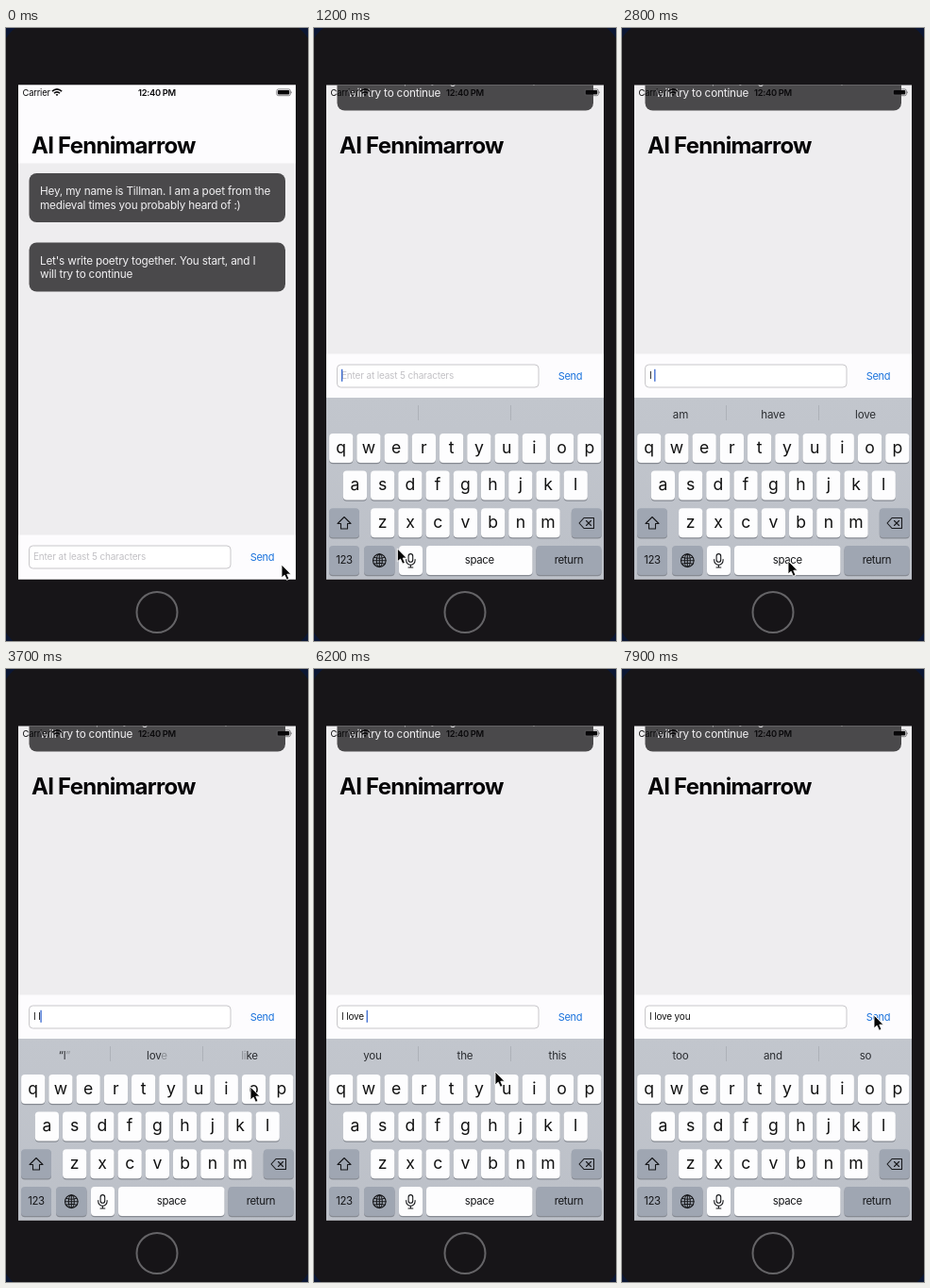
An HTML page that plays this animation: 320x650 px, repeating every 8 s.

```html
<!DOCTYPE html>
<html lang="en">
<head>
<meta charset="utf-8">
<title>Poetry chat</title>
<style>
  html, body { margin: 0; width: 100%; height: 100%; overflow: hidden; background: #0b1633; }
  svg { display: block; width: 320px; height: 650px; }
  text { font-family: Inter, Roboto, sans-serif; white-space: pre; }
  .mid { text-anchor: middle; }
  .bubble { fill: #4a494b; }
  .say { font-size: 11.76px; letter-spacing: -.19px; fill: #f1f0f2; }
  .title { font-size: 24px; font-weight: 700; letter-spacing: -.75px; fill: #060507; }
  .status { font-size: 9.4px; letter-spacing: -.2px; fill: #0a090b; }
  .time { font-weight: 600; letter-spacing: -.3px; }
  .field { font-size: 10px; letter-spacing: -.17px; fill: #111; }
  .hint { fill: #c2c1c5; }
  .send { font-size: 11px; letter-spacing: -.3px; fill: #1a72dc; }
  .letter { font-size: 17.6px; fill: #111; }
  .big { font-size: 27px; }
  .label { font-size: 11.4px; letter-spacing: -.3px; fill: #16171a; }
  .word { font-size: 11.6px; letter-spacing: -.2px; fill: #2b2d31; }
  .faint { fill-opacity: .35; }
  .line { fill: none; stroke: #17181b; stroke-width: 1.1; stroke-linejoin: round; stroke-linecap: round; }
</style>
</head>
<body>
<svg viewBox="0 0 320 650">
  <defs>
    <clipPath id="screen"><rect x="13" y="60.5" width="294" height="524"/></clipPath>
    <linearGradient id="board" x1="0" y1="0" x2="0" y2="1">
      <stop offset="0" stop-color="#c2c6cd"/><stop offset="1" stop-color="#bcc0c8"/>
    </linearGradient>
    <filter id="soft" x="-30%" y="-30%" width="160%" height="160%">
      <feDropShadow dx="0" dy="1" stdDeviation="1.3" flood-color="#555" flood-opacity=".5"/>
    </filter>
  </defs>

  <rect x="-6" y="-8" width="332" height="668" rx="40" fill="#171518"/>
  <circle cx="160" cy="619.5" r="21.5" fill="#161417" stroke="#656467" stroke-width="2"/>

  <g clip-path="url(#screen)">
    <rect x="13" y="60" width="294" height="525" fill="#eeedef"/>
    <rect id="nav" x="13" y="60" width="294" height="83.5" fill="#fdfcfe"/>

    <g id="chat">
      <rect class="bubble" x="24.5" y="154" width="271.5" height="52" rx="8"/>
      <text class="say" x="36" y="177.3">Hey, my name is Tillman. I am a poet from the</text>
      <text class="say" x="36" y="191.5">medieval times you probably heard of :)</text>
      <rect class="bubble" x="24.5" y="227.5" width="271.5" height="52" rx="8"/>
      <text class="say" x="36" y="250.8">Let's write poetry together. You start, and I</text>
      <text class="say" x="36" y="265">will try to continue</text>
    </g>

    <text class="title" x="27" y="132.5">AI Fennimarrow</text>
    <text class="status" x="17.5" y="71.6">Carrier</text>
    <g fill="none" stroke="#0a090b" stroke-width="1.6">
      <path d="M48.9 67.2 Q54 62.4 59.1 67.2M50.9 69.3 Q54 66.3 57.1 69.3"/>
      <path d="M54 72.2 L52.6 70.6 Q54 69.4 55.4 70.6Z" fill="#0a090b" stroke="none"/>
    </g>
    <text class="status time mid" x="160" y="71.6">12:40 PM</text>
    <rect x="286.8" y="64.9" width="14.6" height="6.8" rx="1.9" fill="none" stroke="#555457" stroke-width=".7"/>
    <rect x="287.9" y="66" width="12.4" height="4.6" rx="1" fill="#080709"/>
    <path d="M302.4 67 q1.4 1.3 0 2.6z" fill="#555457"/>

    <g id="bar">
      <rect x="13" y="537.5" width="294" height="47.5" fill="#fdfcfe"/>
      <rect x="24.5" y="549" width="213.5" height="24" rx="4" fill="#fff" stroke="#c8c7ca"/>
      <text id="hint" class="field hint" x="29" y="564.3">Enter at least 5 characters</text>
      <text id="typed" class="field" x="29" y="564.3"></text>
      <rect id="caret" y="553.8" width="1.3" height="13" fill="#3566cf"/>
      <text class="send mid" x="271.5" y="564.6">Send</text>
    </g>

    <g id="keyboard">
      <rect x="13" y="392" width="294" height="195" fill="url(#board)"/>
      <path d="M110.5 400v16M208.5 400v16" stroke="#abafb6" stroke-width=".9"/>
      <rect id="pick" x="14" y="395" width="95" height="31" rx="4" fill="#e3e5e9"/>
      <g id="words"></g>
      <g id="keys"></g>
      <g id="icons" class="line">
        <path d="M32 518.5 L39 525.5 H35.5 V531 H28.5 V525.5 H25Z"/>
        <path d="M281 525 L286 519.5 H296.5 V530.5 H286Z M288.5 522.5l5 5m0-5l-5 5"/>
        <circle cx="69.3" cy="564.7" r="6.8"/>
        <ellipse cx="69.3" cy="564.7" rx="3" ry="6.8"/>
        <path d="M62.5 564.7h13.6M69.3 558v13.6M63.8 561.2q5.5 2 11 0M63.8 568.2q5.5-2 11 0"/>
        <rect x="100.1" y="557.6" width="4.6" height="8.6" rx="2.3"/>
        <path d="M97.7 563.5v1a4.7 4.7 0 0 0 9.4 0v-1M102.4 569.3v2.7M100 572h4.8"/>
      </g>
      <g id="popup">
        <path filter="url(#soft)" fill="#fdfdfe" d="M-21 394q0-8 8-8h26q8 0 8 8v22c0 9-8.5 10-8.5 18v23q0 4-4 4h-17q-4 0-4-4v-23c0-8-8.5-9-8.5-18z"/>
        <text id="popLetter" class="letter big mid" y="414.5"></text>
      </g>
    </g>
  </g>

  <path id="cursor" d="M0 0V14L3.2 11.2L5.5 16.3L8 15.2L5.8 10.2H10Z" fill="#050505" stroke="#fff" stroke-width=".9" stroke-linejoin="round"/>
</svg>
<script>
const $ = id => document.getElementById(id);
const LOOP = 8000, STEP = 100, RISE = 192;

function add(parent, tag, attrs, content = '') {
  const el = document.createElementNS('http://www.w3.org/2000/svg', tag);
  for (const k in attrs) el.setAttribute(k, attrs[k]);
  el.textContent = content;
  parent.append(el);
  return el;
}

const WHITE = '#fdfdfe', GREY = '#9fa6b2';
function addKey(x, y, w, fill, cls, text) {
  add($('keys'), 'rect', { x, y: y + 1.2, width: w, height: 31, rx: 4, fill: '#868a92' });
  const face = add($('keys'), 'rect', { x, y, width: w, height: 31, rx: 4, fill });
  if (text) add($('keys'), 'text', { x: x + w / 2, y: y + (cls === 'letter' ? 20.6 : 19), class: cls + ' mid' }, text);
  return face;
}

const spots = {};
['qwertyuiop', 'asdfghjkl', 'zxcvbnm'].forEach((row, r) => {
  [...row].forEach((ch, i) => {
    const cx = [28.7, 43.4, 72.7][r] + i * 29.23, dy = r * 39.6;
    spots[ch] = [cx, dy];
    addKey(cx - 12.6, 430 + dy, 25.2, WHITE, 'letter', ch);
  });
});
addKey(16, 509.2, 32, GREY);
addKey(272.8, 509.2, 32, GREY);
addKey(16, 549, 32, GREY, 'label', '123');
addKey(53, 549, 32.5, GREY);
addKey(90, 549, 25, WHITE);
const spaceKey = addKey(119, 549, 112.5, WHITE, 'label', 'space');
addKey(235.5, 549, 69, GREY, 'label', 'return');

const wordEls = [62, 160, 258].map(x => add($('words'), 'text', { x, y: 414, class: 'word mid' }));

// time, typed text, suggestions; text between ~ marks is still fading in
const edits = [
  [0, ''],
  [1200, ''],
  [2100, 'I', '“I”', 'I’m', 'I’ll'],
  [2800, 'I ', 'am', 'have', 'love'],
  [3600, 'I l', '“l~”~', 'lov~e~', '~li~ke'],
  [3800, 'I l', '“l”', 'love', 'like'],
  [4000, 'I lo', '“lo”', 'love', 'look'],
  [4800, 'I lov', '“lov”', 'love', 'loved'],
  [5300, 'I love', '“love”', 'loved', 'lover'],
  [5900, 'I love ', 'you', 'the', 'this'],
  [6700, 'I love you ', 'too', 'and', 'so']
];
const taps = [[2000, 2100, 'i'], [3400, 3600, 'l'], [3800, 4000, 'o'], [4600, 4800, 'v'], [5100, 5300, 'e'],
  [2700, 2800, 'space'], [5800, 5900, 'space'], [6600, 6700, 'pick']];

// time, x, y of the pointer tip
const path = [
  [0, 292, 569], [700, 82, 557], [1100, 82, 557], [1900, 230, 438], [2100, 230, 438],
  [2600, 176, 565], [2900, 176, 565], [3300, 271, 481], [3500, 271, 481], [3700, 259, 443],
  [3900, 259, 443], [4500, 160, 526], [4700, 160, 526], [5000, 87, 453], [5200, 87, 453],
  [5700, 160, 560], [5900, 160, 560], [6200, 192, 427], [6400, 160, 446], [6600, 64, 407],
  [6800, 64, 407], [7200, 74, 399], [7800, 267, 367], [8000, 267, 367]
];

function pointer(t) {
  const i = path.findIndex(p => p[0] > t);
  const a = path[i - 1], b = path[i];
  let k = (t - a[0]) / (b[0] - a[0]);
  k = k * k * (3 - 2 * k);
  return [a[1] + (b[1] - a[1]) * k, a[2] + (b[2] - a[2]) * k];
}

function setWord(el, mark = '') {
  el.textContent = '';
  mark.split('~').forEach((part, i) => add(el, 'tspan', i % 2 ? { class: 'faint' } : {}, part));
}

const show = (el, on) => el.style.display = on ? '' : 'none';
const move = (el, x, y) => el.setAttribute('transform', `translate(${x} ${y})`);

function draw(t) {
  const rise = t < 1000 ? 0 : t < 1100 ? 87.5 : t < 1200 ? 168 : RISE;
  move($('chat'), 0, -rise);
  move($('bar'), 0, -rise);
  move($('keyboard'), 0, RISE - rise);
  show($('keyboard'), rise > 0);
  show($('nav'), rise === 0);

  const [since, text, ...words] = edits.filter(e => e[0] <= t).pop();
  $('typed').textContent = text;
  show($('hint'), !text);
  wordEls.forEach((el, i) => setWord(el, words[i]));
  $('caret').setAttribute('x', 29 + (text ? $('typed').getComputedTextLength() : 0));
  show($('caret'), t >= 1200 && (t - since) % 800 < 400);

  const tap = (taps.find(p => p[0] <= t && t < p[1]) || [])[2];
  spaceKey.setAttribute('fill', tap === 'space' ? GREY : WHITE);
  show($('pick'), tap === 'pick');
  show($('popup'), tap in spots);
  if (tap in spots) {
    move($('popup'), ...spots[tap]);
    $('popLetter').textContent = tap;
  }
  move($('cursor'), ...pointer(t));
}

let last = -1;
const start = performance.now();
function tick() {
  const t = Math.floor(((performance.now() - start) % LOOP) / STEP) * STEP;
  if (t !== last) draw(last = t);
  requestAnimationFrame(tick);
}
tick();
</script>
</body>
</html>
```
